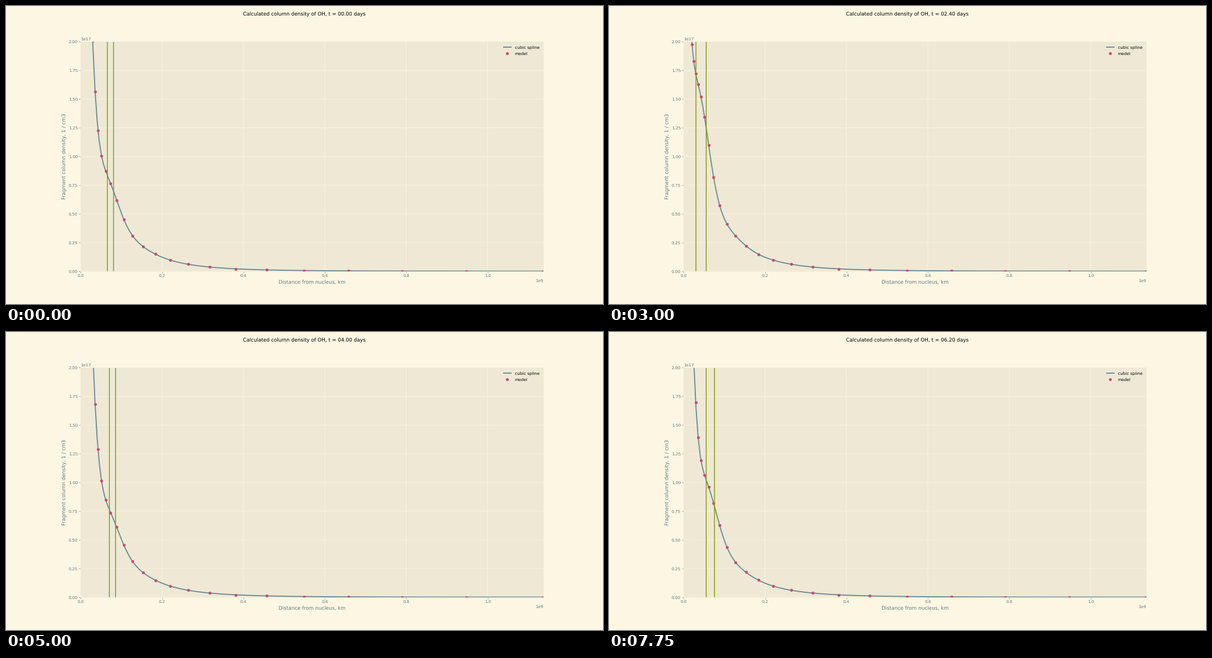
A matplotlib script that plays this animation: 1058x529 px, repeating every 8 s.

```python
import numpy as np
import matplotlib.pyplot as plt
from matplotlib.animation import FuncAnimation

FRAMES, INTERVAL = 32, 250
DAYS_PER_FRAME = 0.2
PERIOD = 1.0135          # days per production cycle
R_MAX = 1.1367e9         # km
GRID_RATIO = 1.2         # spacing of the logarithmic model grid
STEP = R_MAX / 225       # km between curve samples
UNIT = 1e17

PAPER, PANEL, INK = "#fdf6e3", "#eee8d5", "#657b83"
BLUE, RED, GREEN = "#688894", "#c74a77", "#859900"

model_r = R_MAX * GRID_RATIO ** np.arange(-24.0, 1.0)
curve_r = STEP * np.arange(3, 226)


def column_density(r, phase):
    """Steady profile minus a damped wave that travels through the coma."""
    q = r / 1e7
    steady = 32.53 * q ** 0.53 * np.exp(-2.1645 * q ** 0.4)
    amplitude = 1.571 * np.exp(-0.404 * q)
    trough = 0.585 - 0.1197 * q + 0.00078 * q ** 2
    return UNIT * (steady - amplitude * np.cos(2 * np.pi * (phase - trough)))


def bump_edges(phase):
    """Inner and outer inflection of the bump, snapped to the curve samples."""
    inner = 13 - 22 * phase + 9.2 * phase ** 2
    outer = 16.1 - 13 * phase - 8.2 * phase ** 4
    return round(inner) * STEP, round(outer) * STEP


plt.rcParams.update({
    "font.family": "DejaVu Sans", "font.size": 10, "text.hinting": "none",
    "figure.facecolor": PAPER, "axes.facecolor": PANEL, "axes.edgecolor": PANEL,
    "axes.linewidth": 1, "axes.labelcolor": INK, "axes.labelsize": 12,
    "axes.axisbelow": True, "axes.grid": True, "grid.color": PAPER,
    "grid.linewidth": 1, "xtick.color": INK, "ytick.color": INK,
    "lines.solid_capstyle": "butt",
})

fig, ax = plt.subplots(figsize=(20, 10), dpi=52.9)
title = fig.suptitle("")
ax.set(xlim=(0, R_MAX), ylim=(0, 2 * UNIT),
       xlabel="Distance from nucleus, km",
       ylabel="Fragment column density, 1 / cm3")
plt.setp(ax.get_xgridlines() + ax.get_ygridlines(), snap=False)

curve, = ax.plot([], [], color=BLUE, linewidth=2.5, label="cubic spline")
dots, = ax.plot([], [], "o", color=RED, markersize=6, label="model")
edge_lines = [ax.axvline(0, color=GREEN, linewidth=2, snap=False) for _ in range(2)]
ax.legend(handles=[curve, dots], loc="upper right", frameon=False,
          labelspacing=0.6, borderaxespad=0.55)


def update(frame):
    day = frame * DAYS_PER_FRAME
    phase = day / PERIOD % 1
    title.set_text(f"Calculated column density of OH, t = {day:05.2f} days")
    curve.set_data(curve_r, column_density(curve_r, phase))
    dots.set_data(model_r, column_density(model_r, phase))

    # The bump is too faint to have inflections late in the cycle.
    bump_phase = phase if phase < 0.85 else phase - 1
    for line, x in zip(edge_lines, bump_edges(bump_phase)):
        line.set_xdata([x, x])
        line.set_visible(-0.07 < bump_phase < 0.77)
    return [title, curve, dots, *edge_lines]


anim = FuncAnimation(fig, update, frames=FRAMES, interval=INTERVAL,
                     repeat=True, repeat_delay=0, blit=False)
plt.show()
```
